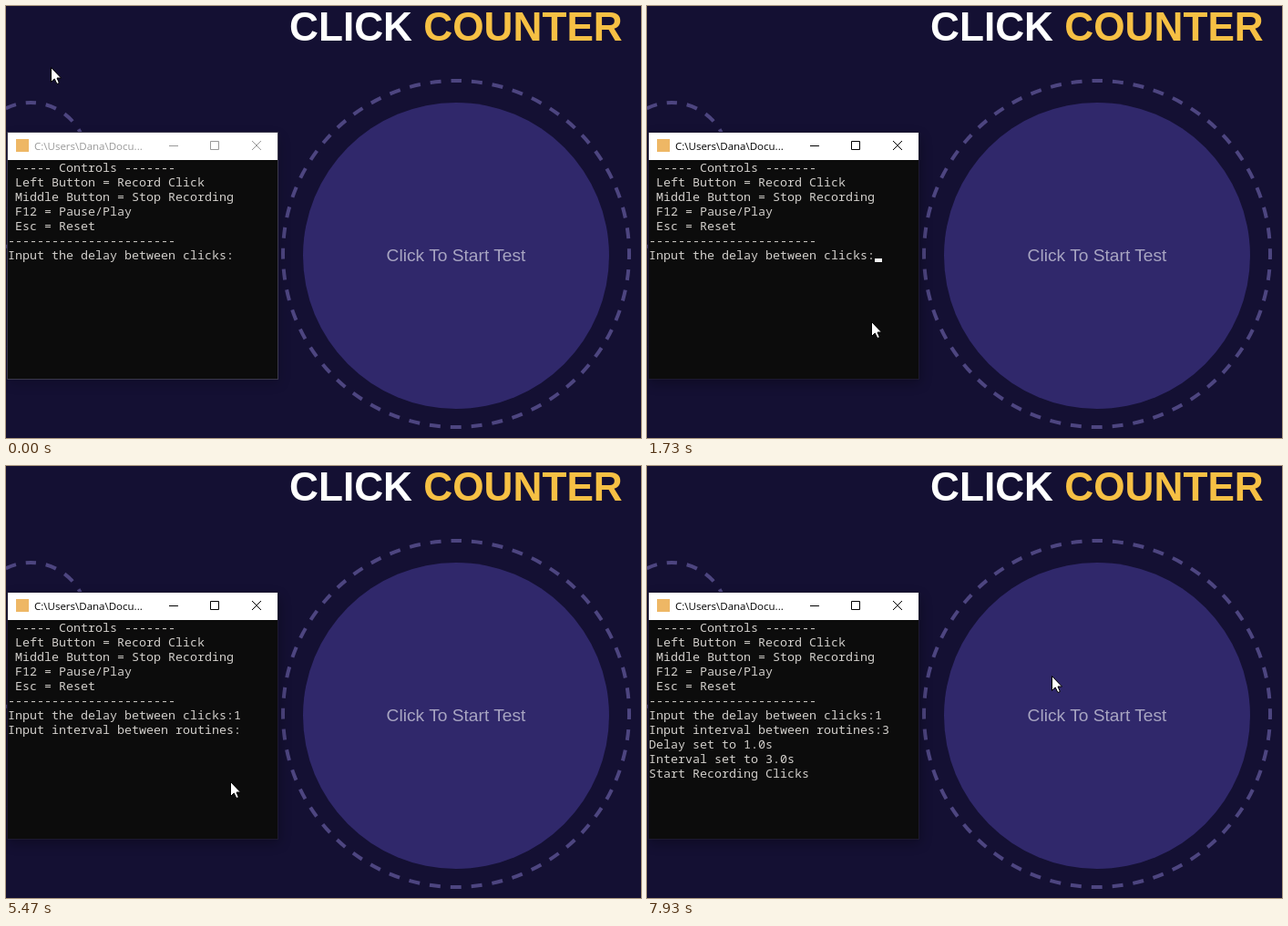
Recreate the animation shown at these times as an HTML page. Size 697 by 474 pixels, loop 8000 ms.

```html
<!DOCTYPE html>
<html lang="en">
<head>
<meta charset="utf-8">
<title>Click counter</title>
<style>
  html, body { margin: 0; width: 100%; height: 100%; overflow: hidden; background: #141033; }
  svg { display: block; }
  .sans { font-family: "Liberation Sans", Arial, sans-serif; }
  .ring { fill: none; stroke: #4d4580; stroke-width: 4; }
  #console text { font: 13.333px "Noto Sans Mono", "Liberation Mono", monospace; fill: #d2cfcb; white-space: pre; }
  #caption { font: 11.5px "Open Sans", sans-serif; }
  #shadow { filter: blur(7px); }
</style>
</head>
<body>
<svg width="697" height="474" viewBox="0 0 697 474">
  <rect width="697" height="474" fill="#141033"/>
  <g class="sans">
    <text x="311" y="38" font-size="44.2" font-weight="bold" fill="#fff">CLICK <tspan fill="#f6c044">COUNTER</tspan></text>
    <g id="rings"></g>
    <circle cx="494" cy="274" r="168" fill="#30286b"/>
    <text x="494" y="280" font-size="19.2" text-anchor="middle" fill="#a8a5c2">Click To Start Test</text>
  </g>
  <rect id="shadow" x="2" y="144" width="298" height="270" fill="#000"/>
  <rect id="frame" x="1" y="138" width="298" height="272"/>
  <rect x="2" y="139" width="296" height="30" fill="#fff"/>
  <rect x="2" y="169" width="296" height="240" fill="#0c0c0c"/>
  <rect x="11" y="146" width="14" height="14" fill="#eeb765"/>
  <g id="titlebar">
    <text id="caption" x="31" y="158">C:\Users\Dana\Docu...</text>
    <path id="buttons" fill="none" d="M179 153.5h10M224.5 148.5h9v9h-9zM270 148l10 10M280 148l-10 10"/>
  </g>
  <g id="console"></g>
  <rect id="caret" width="8" height="4" fill="#f2f2f2"/>
  <path id="pointer" d="M.5.5V16.5L4.2 12.9 6.9 18.5 9.4 17.5 7 12H11.5Z" fill="#fff" stroke="#000"/>
</svg>
<script>
const LOOP = 8000;
const $ = id => document.getElementById(id);

function add(parent, tag, attrs) {
  const el = document.createElementNS("http://www.w3.org/2000/svg", tag);
  for (const name in attrs) el.setAttribute(name, attrs[name]);
  return parent.appendChild(el);
}

// A ring of evenly spaced dashes with one dash centred at the top.
function addRing(x, y, r, dashes) {
  const step = 2 * Math.PI * r / dashes, dash = 12;
  add($("rings"), "circle", {
    class: "ring", r, transform: `translate(${x} ${y}) rotate(-90)`,
    "stroke-dasharray": `${dash} ${step - dash}`, "stroke-dashoffset": dash / 2
  });
}
addRing(494, 272, 190, 52);
addRing(27, 168, 62, 17);
addRing(27, 320, 62, 17);

// Console text: [time it appears, row, column, text]
const output = [
  [0, 0, 1, "----- Controls -------"],
  [0, 1, 1, "Left Button = Record Click"],
  [0, 2, 1, "Middle Button = Stop Recording"],
  [0, 3, 1, "F12 = Pause/Play"],
  [0, 4, 1, "Esc = Reset"],
  [0, 5, 0, "-----------------------"],
  [0, 6, 0, "Input the delay between clicks:"],
  [2800, 6, 31, "1"],
  [3670, 7, 0, "Input interval between routines:"],
  [6270, 7, 32, "3"],
  [6600, 8, 0, "Delay set to 1.0s"],
  [6600, 9, 0, "Interval set to 3.0s"],
  [6600, 10, 0, "Start Recording Clicks"]
].map(([from, row, col, text]) => {
  const el = add($("console"), "text", { x: 2 + col * 8, y: 182 + row * 16 });
  el.textContent = text;
  return { from, el };
});

// Visible caret spans: [from, to, row, column]
const carets = [
  [1730, 2270, 6, 31], [2800, 3330, 6, 32], [3670, 4400, 7, 32],
  [4930, 5470, 7, 32], [6000, 6270, 7, 32], [6270, 6470, 7, 33],
  [6530, 6600, 8, 0], [6600, 7530, 11, 0]
];

const smooth = p => p * p * (3 - 2 * p);
const linear = p => p;

// Pointer moves in ticks of 1/15 s: [start, end, from, to, easing]
const moves = [
  [0, 8, [49, 67], [132, 149], smooth],
  [14, 17, [132, 149], [192, 244], linear],
  [17, 21, [192, 244], [246, 346], p => 1 - (1 - p) ** 1.5],
  [115, 119, [246, 346], [444, 230], p => p ** 1.2]
];

function pointerAt(t) {
  const tick = Math.floor((t + 4) * 0.015);
  const [start, end, a, b, ease] = moves.findLast(m => tick >= m[0]);
  const p = ease(Math.min(1, (tick - start) / (end - start)));
  return a.map((v, i) => Math.round(v + (b[i] - v) * p));
}

function draw(t) {
  const active = t >= 670;
  const ink = active ? "#000" : "#999";
  $("caption").setAttribute("fill", ink);
  $("buttons").setAttribute("stroke", ink);
  $("frame").setAttribute("fill", active ? "#1d1930" : "#3b384b");
  $("shadow").setAttribute("opacity", active ? 0.3 : 0.18);

  for (const { from, el } of output) el.setAttribute("visibility", t >= from ? "visible" : "hidden");

  const caret = carets.find(([from, to]) => t >= from && t < to);
  $("caret").setAttribute("visibility", caret ? "visible" : "hidden");
  if (caret) {
    $("caret").setAttribute("x", 2 + caret[3] * 8);
    $("caret").setAttribute("y", 181 + caret[2] * 16);
  }
  $("pointer").setAttribute("transform", `translate(${pointerAt(t)})`);
}

function tick() {
  draw(performance.now() % LOOP);
  requestAnimationFrame(tick);
}
tick();
</script>
</body>
</html>
```
